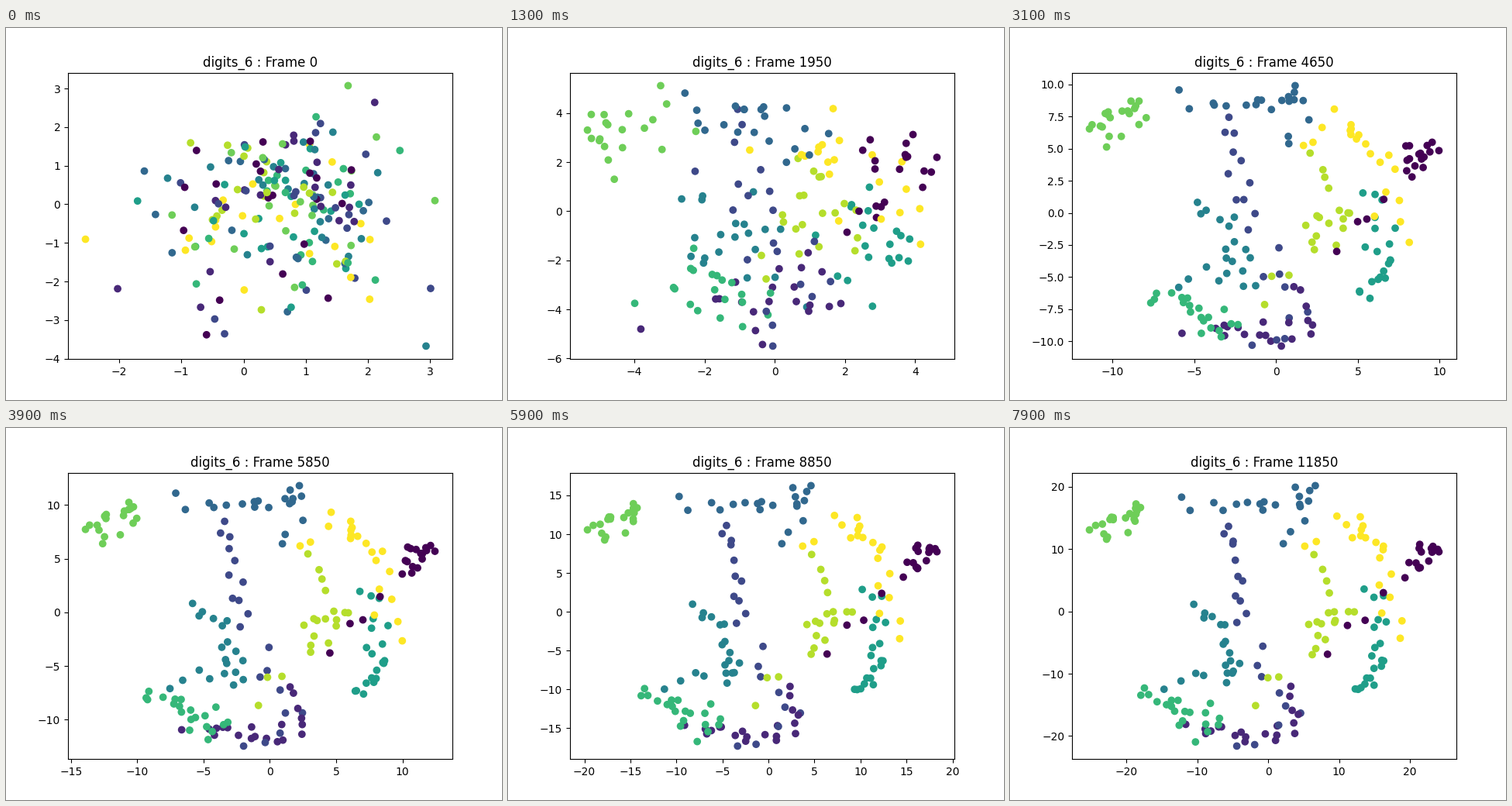
A matplotlib script for the animation above (8000 ms loop, 640 px wide and 480 px high).

```python
import numpy as np
import matplotlib.pyplot as plt
from matplotlib.animation import FuncAnimation

FRAMES, STEP, MS = 80, 150, 100
PER_CLASS = 20
JITTER = 0.75
SHEAR = 0.2

# Each class settles along one short path
PATHS = [
    [(24, 9.5), (22.5, 10.5), (22.5, 8.5), (21, 7), (9, -6.5)],
    [(-12, -18), (-7.5, -17.5), (-3, -19), (0, -19.2), (4.5, -18), (3, -10.5)],
    [(-6, 12.5), (-4.6, 10), (-5, 3.5), (-4, -1), (-1, -10), (4, -15.5), (-5, -21)],
    [(-12, 17.5), (-3.5, 16), (2, 17), (7, 19.5), (1.8, 11)],
    [(-11, .5), (-7, 0), (-6, -6), (-4.5, -8.5), (-6.5, -9), (-15, -11.5)],
    [(15.2, 3.7), (15.7, -2), (15.5, -8), (15.3, -10), (13, -11)],
    [(-17.5, -12.6), (-14.5, -13.5), (-13.5, -16), (-7.4, -15), (-9.5, -20)],
    [(-25, 12.7), (-22.5, 12.5), (-21.5, 16), (-18.5, 16.5), (-18, 13)],
    [(6.3, 9), (8.5, 1), (11.5, 0), (6.3, -1.5), (7.5, -5), (-3.4, -14)],
    [(5, 11), (12, 14.5), (12.8, 12.5), (16, 10.5), (16.2, 5), (19, -4)],
]

# Axis limits at a few moments: left, right, bottom, top
TIMES = [0, 7, 19, 31, 39, 59, 79]
LIMITS = np.array([
    (-2.82, 3.355, -4.01, 3.41),
    (-3.58, 3.26, -4.27, 3.84),
    (-8.09, 6.97, -7.78, 7.46),
    (-12.46, 11.02, -11.4, 10.93),
    (-15.23, 13.77, -13.66, 13.02),
    (-21.56, 20.2, -18.97, 17.93),
    (-27.65, 26.55, -23.7, 22.28),
])

rng = np.random.default_rng(6)


def along(path):
    """Spread one class evenly over the legs of its path."""
    legs = np.arange(len(path))
    at = np.linspace(0, legs[-1], PER_CLASS)
    return np.column_stack([np.interp(at, legs, axis) for axis in zip(*path)])


# Shuffle so that classes overlap in mixed order
label = rng.permutation(np.repeat(np.arange(len(PATHS)), PER_CLASS))
end = np.empty((len(label), 2))
for k, path in enumerate(PATHS):
    end[label == k] = along(path)
end += rng.normal(0, JITTER, end.shape)
start = rng.normal(0, 1, end.shape)


def layout(u):
    """Random cloud at u = 0, sorted classes at u = 1."""
    cloud = (1 - u) ** 2
    grow = u + 0.035 * np.sin(np.pi * u)
    pts = grow * end
    pts[:, 0] -= SHEAR * cloud * pts[:, 1]
    return pts + cloud * start


def fit(pts, low, high):
    """Fill the axes up to the usual margin of 5 % of the data range."""
    pad = (high - low) / 22
    p0, p1 = pts.min(0), pts.max(0)
    return low + pad + (pts - p0) / (p1 - p0) * (high - low - 2 * pad)


fig, ax = plt.subplots(figsize=(6.4, 4.8), dpi=100)
dots = ax.scatter(*start.T, c=label, cmap="viridis")


def update(i):
    x0, x1, y0, y1 = (np.interp(i, TIMES, column) for column in LIMITS.T)
    pts = layout(i / (FRAMES - 1))
    dots.set_offsets(fit(pts, np.array([x0, y0]), np.array([x1, y1])))
    ax.set(xlim=(x0, x1), ylim=(y0, y1))
    ax.set_title(f"digits_6 : Frame {i * STEP}")
    return dots,


anim = FuncAnimation(fig, update, frames=FRAMES, interval=MS, repeat=True)
plt.show()
```
